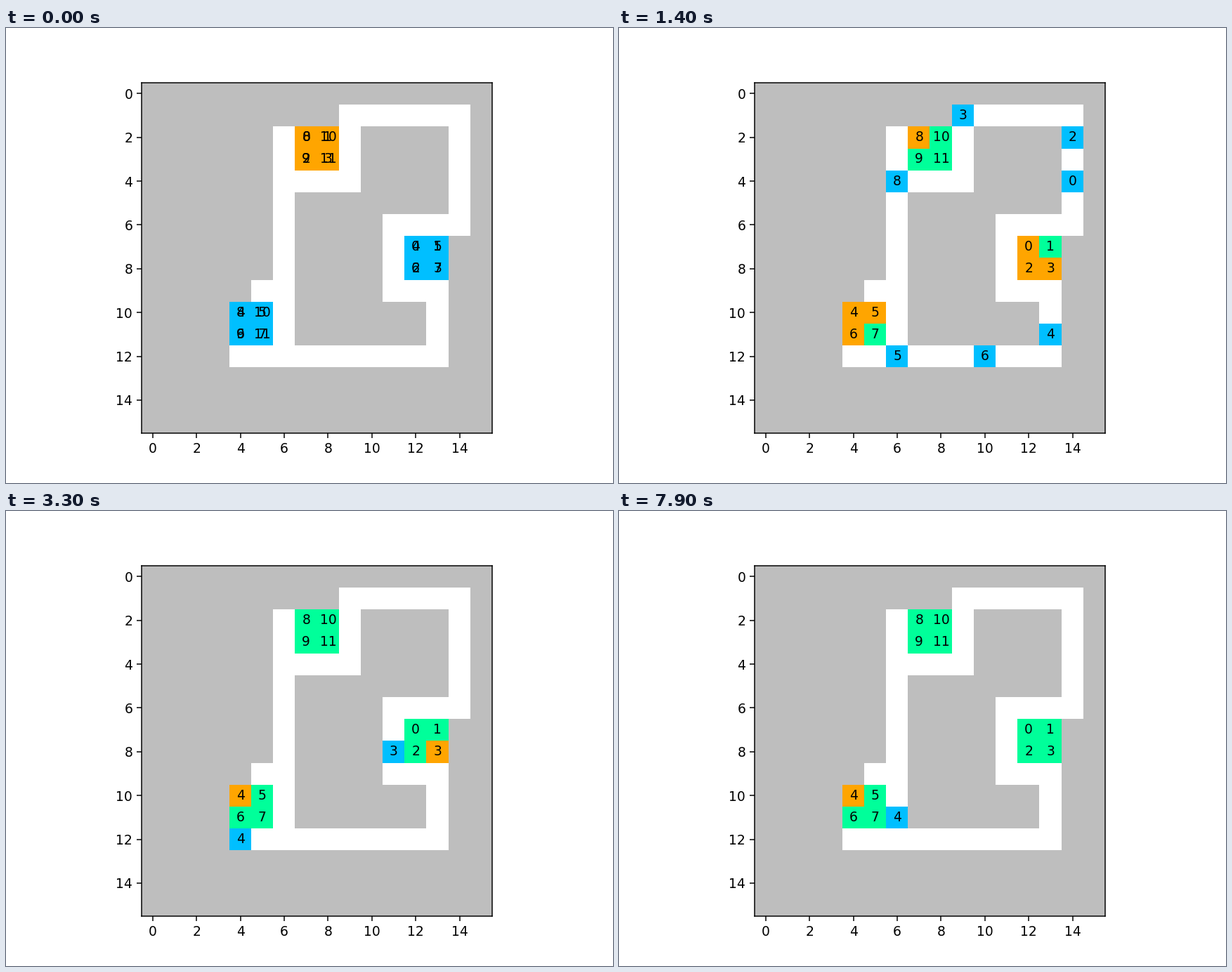
Animation, 864 px wide and 648 px high, one loop 8 s. Source, as a matplotlib script:

```python
import matplotlib.pyplot as plt
import numpy as np
from matplotlib.animation import FuncAnimation

FRAMES, INTERVAL = 80, 100
SIZE = 16
WALL, FLOOR = (190, 190, 190), (255, 255, 255)
AGENT, GOAL, HOME = (0, 191, 255), (255, 165, 0), (0, 255, 154)

# Corridor corners; each polyline is walked in straight legs.
CORRIDORS = [
    [(9, 4), (9, 1), (14, 1), (14, 6), (11, 6), (11, 9), (13, 9), (13, 12), (4, 12)],
    [(6, 12), (6, 2)],
    [(5, 9), (6, 9)],
    [(6, 4), (9, 4)],
]

STEPS = {"W": (0, 0), "L": (-1, 0), "R": (1, 0), "U": (0, -1), "D": (0, 1)}

# Start cell, goal cell and route; W waits, the other letters move.
AGENTS = [
    ((7, 2), (12, 7), "W2 R2 U1 R3 W1 R2 D5 L2 D1"),
    ((8, 2), (13, 7), "R1 U1 R5 D5 L1 D1"),
    ((7, 3), (12, 8), "W4 U1 R2 U1 R5 D5 L3 D2 R1"),
    ((8, 3), (13, 8), "W7 U1 W3 R1 W1 U1 W4 R5 D5 L3 D2 W3 D1 R2 U1"),
    ((12, 7), (4, 10), "W5 R1 D2 W4 D2 W3 D1 L8 W1 L1 W11 R2 U2 W31 D2 R1 L1 U1"),
    ((13, 7), (5, 10), "W2 D5 L7 U2 L1"),
    ((12, 8), (4, 11), "W5 R1 D2 W1 D2 L9 U1 W52 D1 W1 U1"),
    ((13, 8), (5, 11), "D4 L8 U1"),
    ((4, 10), (7, 2), "W6 R1 U1 R1 U7 R1"),
    ((4, 11), (7, 3), "W2 R2 U8 R1"),
    ((5, 10), (8, 2), "U1 R1 U6 R2 U1"),
    ((5, 11), (8, 3), "W1 R1 U8 R2"),
]


def build_maze():
    grid = np.full((SIZE, SIZE, 3), WALL, np.uint8)
    for corners in CORRIDORS:
        for (xa, ya), (xb, yb) in zip(corners, corners[1:]):
            rows = slice(min(ya, yb), max(ya, yb) + 1)
            cols = slice(min(xa, xb), max(xa, xb) + 1)
            grid[rows, cols] = FLOOR
    return grid


def trace(start, route):
    """Cell of an agent at every frame; it rests once the route is done."""
    moves = "".join(leg[0] * int(leg[1:]) for leg in route.split())
    x, y = start
    cells = [start]
    for move in moves.ljust(FRAMES - 1, "W"):
        dx, dy = STEPS[move]
        x, y = x + dx, y + dy
        cells.append((x, y))
    return cells


maze = build_maze()
paths = [trace(start, route) for start, _, route in AGENTS]
goals = [goal for _, goal, _ in AGENTS]

fig, ax = plt.subplots(figsize=(6.4, 4.8), dpi=135)
image = ax.imshow(maze, interpolation="nearest")


def label(cell, number):
    return ax.text(*cell, str(number), ha="center", va="center")


for number, goal in enumerate(goals):
    label(goal, number)
labels = [label(path[0], number) for number, path in enumerate(paths)]


def update(frame):
    grid = maze.copy()
    for path, goal, text in zip(paths, goals, labels):
        x, y = cell = path[frame]
        home = cell == goal
        grid[y, x] = AGENT
        grid[goal[1], goal[0]] = HOME if home else GOAL
        text.set_position(cell)
        text.set_visible(not home)
    image.set_data(grid)
    return [image, *labels]


anim = FuncAnimation(fig, update, frames=FRAMES, interval=INTERVAL,
                     repeat=True, repeat_delay=0, blit=False)
plt.show()
```
